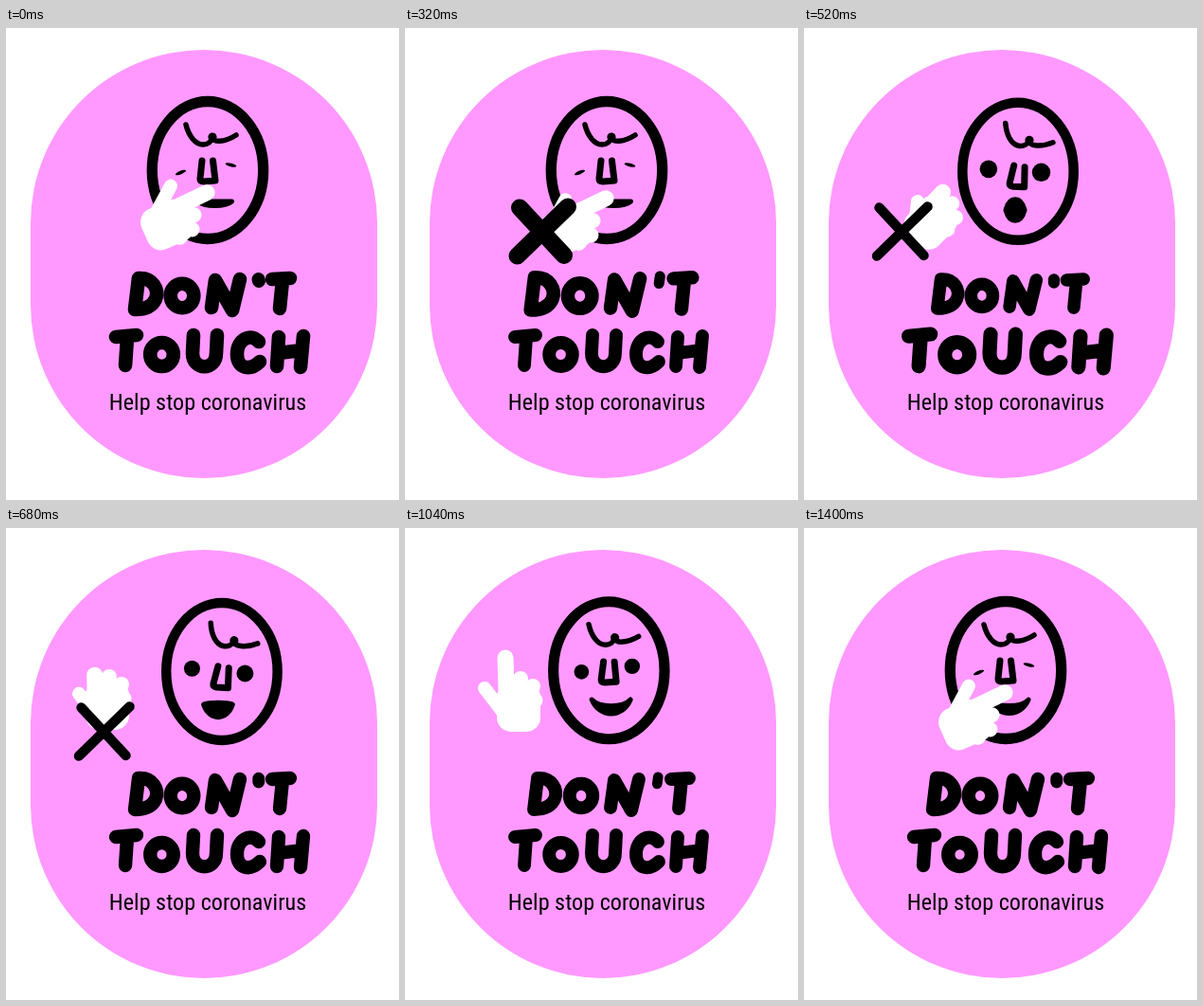
Animation, 415 px wide and 498 px high, one loop 1440 ms. Source, as an HTML page:

```html
<!DOCTYPE html>
<html lang="en">
<head>
<meta charset="utf-8">
<title>Don't touch</title>
<style>
  html, body { margin: 0; width: 100%; height: 100%; overflow: hidden; background: #fff; }
  svg { display: block; width: 100vw; height: 100vh; }
  .line { fill: none; stroke: #000; stroke-linecap: round; stroke-linejoin: round; }
  #hand { fill: #fff; stroke: #fff; stroke-linecap: round; }
  #palm { stroke: none; }
  #caption { font: 24px "Roboto Condensed", Roboto, sans-serif; font-stretch: 75%; text-anchor: middle; }
</style>
</head>
<body>
<svg viewBox="0 0 415 498">
  <rect x="26" y="23" width="366" height="452" rx="183" fill="#ff99ff"/>

  <ellipse id="head" class="line" cx="213" cy="150" rx="58.7" ry="72.5"/>
  <g id="hair">
    <path class="line" stroke-width="5.5" d="M190 102C193 114 200 123 208 123C213 123 217 120 218 115C218 122 232 120 243 113"/>
    <circle cx="218" cy="115" r="4.6"/>
  </g>
  <ellipse id="eyeL"/>
  <ellipse id="eyeR"/>
  <path id="nose" class="line" stroke-width="7" d="M207 140L205 159Q205 162 209 162L221 161L218.5 140"/>
  <path id="mouth" stroke="#000" stroke-linejoin="round"/>

  <g id="hand">
    <g id="palm">
      <rect x="-23" y="-22" width="46" height="52" rx="15"/>
      <circle cx="2" cy="-26" r="8"/>
      <circle cx="15" cy="-18" r="8"/>
      <circle cx="17.5" cy="-3" r="8"/>
    </g>
    <path id="index" stroke-width="17"/>
    <path id="thumb" stroke-width="14"/>
  </g>

  <path id="cross" class="line" d="M-24 -25L23 25.5M27 -26L-26.5 26"/>

  <g id="dont" class="line">
    <path d="M140 264C155 263 162 276 158 286C154 295 145 297 136 297Z"/>
    <ellipse cx="186" cy="282.5" rx="12.3" ry="12.8"/>
    <path d="M217 295L221 266L239 298L247 265"/>
    <path id="mark"/>
    <path d="M281 265L300 264M292 266L289 296"/>
  </g>
  <g id="touch" class="line">
    <path d="M116 326L138 324M128 327L126 356"/>
    <ellipse cx="164.5" cy="344.5" rx="12.3" ry="12.5"/>
    <path d="M198 324L197 343C197 362 222 362 222 343L223 324"/>
    <path d="M267 331C258 321 244 329 244 344C244 360 258 362 268 352"/>
    <path d="M288 326L286 357M314 325L311 358M288 343L312 340"/>
  </g>
  <text id="caption" x="213" y="402.5">Help stop coronavirus</text>
</svg>
<script>
const LOOP = 1440, STEP = 40, TAU = 2 * Math.PI;
const el = {};
document.querySelectorAll('[id]').forEach(n => el[n.id] = n);
const set = (node, attrs) => {
  for (const k in attrs) node.setAttribute(k, attrs[k]);
};

const clamp = u => Math.min(1, Math.max(0, u));
const ramp = (t, from, to) => {
  const u = clamp((t - from) / (to - from));
  return u * u * (3 - 2 * u);
};
// Blend of the resting, shocked and smiling value
const mix = (rest, shock, smile, s, m) => rest * (1 - s - m) + shock * s + smile * m;

function drawFace(t) {
  // The head jolts away from the hand, then eases back
  const d = 13 * ramp(t, 400, 520) + 2 * ramp(t, 520, 700) - 15 * ramp(t, 860, 1100);
  const change = ramp(t, 600, 760);
  const shock = ramp(t, 400, 510) - change;
  const smile = change - ramp(t, 1390, 1460);
  const open = ramp(t, 400, 510) - ramp(t, 1080, 1340);

  const ride = (node, x, y, turn, px, py) =>
    set(node, { transform: `translate(${x * d} ${y * d}) rotate(${turn * d} ${px} ${py})` });
  set(el.head, { 'stroke-width': 11.3 - .06 * d });
  ride(el.head, 1, .1, 0, 213, 150);
  ride(el.hair, 1.55, .25, .8, 218, 114);
  ride(el.nose, 1, .45, .6, 213, 152);

  const eye = (node, cx, cy, size, tilt) => set(node, {
    cx, cy,
    rx: 6 + (size - 6) * open + 1.5 * shock,
    ry: 1.8 + (size - 1.8) * open + 1.5 * shock,
    transform: `rotate(${tilt * (1 - open)} ${cx} ${cy})`
  });
  eye(el.eyeL, 184.5 + .8 * d, 152.5 - .28 * d, 7.8, -22);
  eye(el.eyeR, 237.5 + d, 144.5 + .6 * d, 8.2, 14);

  const blend = (a, b, c) => mix(a, b, c, shock, smile);
  const w = blend(18, 8.5, 20.5), top = blend(0, -13, 9), low = blend(6, 13, 20);
  set(el.mouth, {
    d: `M${-w} 0C${-.6 * w} ${top} ${.6 * w} ${top} ${w} 0C${.6 * w} ${low} ${-.6 * w} ${low} ${-w} 0Z`,
    transform: `translate(${216.5 + .5 * d + blend(4, 0, 0)} ${blend(183, 192, 181)})`,
    'stroke-width': blend(5, 8, 5)
  });
}

function drawHand(t) {
  const nudge = ramp(t, 200, 320);
  const away = ramp(t, 380, 640);
  const turn = ramp(t, 420, 680);
  const drift = ramp(t, 860, 1040);
  const back = ramp(t, 1100, 1400);
  const fold = ramp(t, 410, 520) - drift;

  const x = 174 - 67 * away + 13 * drift + 54 * back;
  const y = 206 + 6 * nudge - 29 * turn + 2 * drift + 21 * back;
  const index = 1 - .65 * fold;
  const thumb = 1 - .3 * (nudge - drift) - (away - turn);
  set(el.hand, { transform: `translate(${x} ${y}) rotate(${66 * (1 - turn + back)})` });
  set(el.index, { d: `M-13 -15L${-13 - index} ${-17 - 31 * index}` });
  set(el.thumb, { d: `M-16 10L${-16 - 20 * thumb} ${10 - 26 * thumb}` });
}

function drawCross(t) {
  const pop = ramp(t, 220, 300) - ramp(t, 860, 980);
  const move = ramp(t, 390, 520);
  set(el.cross, {
    transform: `translate(${145 - 41.5 * move} 214.5) scale(${pop})`,
    'stroke-width': 18 - 7.5 * move,
    visibility: pop > .01 ? 'visible' : 'hidden'
  });
}

function drawWords(t) {
  const boil = .5 + .5 * Math.cos(TAU * t / 240);
  const word = (node, scale, x, y) => set(node, {
    transform: `translate(${x} ${y}) scale(${scale}) translate(${-x} ${-y})`,
    'stroke-width': 13.6 + boil
  });
  word(el.dont, 1 + .058 * Math.sin(TAU * clamp((t - 280) / 320)), 218, 281);
  word(el.touch, 1 + .16 * Math.sin(Math.PI * clamp((t - 320) / 225)), 216, 341);
  set(el.mark, {
    d: `M${267.5 - boil} ${262 + 3 * boil}L${266 + boil} ${271 - 4 * boil}`,
    'stroke-width': 9.5 + 4.5 * boil
  });
}

function frame() {
  const t = Math.floor(performance.now() % LOOP / STEP) * STEP;
  drawFace(t);
  drawHand(t);
  drawCross(t);
  drawWords(t);
  requestAnimationFrame(frame);
}

el.caption.style.fontSize = 24 * 208.5 / el.caption.getComputedTextLength() + 'px';
frame();
</script>
</body>
</html>
```
